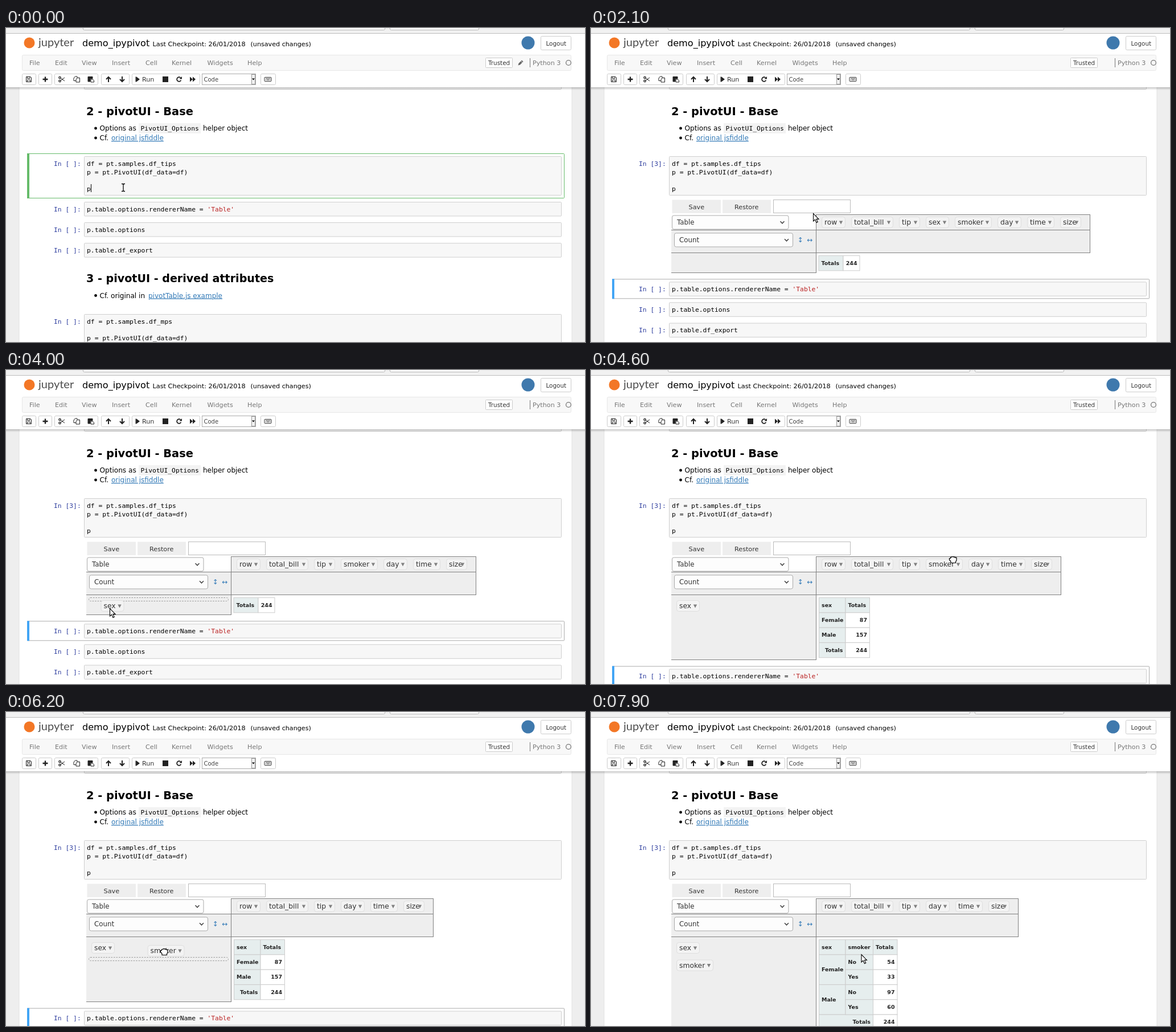
Animation, 1017 px wide and 551 px high, one loop 8000 ms. Source, as an HTML page:

```html
<!DOCTYPE html>
<html lang="en">
<head>
<meta charset="utf-8">
<title>Notebook pivot demo</title>
<style>
html, body { margin: 0; width: 100%; height: 100%; overflow: hidden; background: #eee; }
svg { display: block; width: 1017px; height: 551px; }
text { font-family: "DejaVu Sans", sans-serif; white-space: pre; }
.code { font: 11.33px "DejaVu Sans Mono", monospace; }
.bold { font-weight: bold; }
.word { font-family: Lato, sans-serif; }
</style>
</head>
<body>
<svg viewBox="0 0 1017 551" xmlns="http://www.w3.org/2000/svg">
  <g id="page"></g>
  <g id="head"></g>
  <g id="over"></g>
</svg>
<script>
const LOOP = 8000, STEP = 100;
const $ = id => document.getElementById(id);

// Drawing helpers
const rect = (x, y, x2, y2, fill, stroke = 'none', r = 0, extra = '') =>
  `<rect x="${x}" y="${y}" width="${x2 - x}" height="${y2 - y}" fill="${fill}" stroke="${stroke}" rx="${r}" ${extra}/>`;
const path = (d, stroke = '#222', fill = 'none', w = 1) =>
  `<path d="${d}" stroke="${stroke}" fill="${fill}" stroke-width="${w}"/>`;
const text = (x, y, s, size, fill = '#000', extra = '') =>
  `<text x="${x}" y="${y}" font-size="${size}" fill="${fill}" ${extra}>${s}</text>`;
const code = (x, y, s, fill = '#000') => text(x, y, s, 11.33, fill, 'class="code"');
const bold = (x, y, s, size, extra = '') => text(x, y, s, size, '#000', `class="bold" ${extra}`);
const circle = (x, y, r, fill, stroke = 'none') =>
  `<circle cx="${x}" cy="${y}" r="${r}" fill="${fill}" stroke="${stroke}" stroke-width="1.3"/>`;
const at = (x, y, s) => `<g transform="translate(${x} ${y})">${s}</g>`;
const link = (x, y, s) => text(x, y, s, 12, '#337ab7', 'text-decoration="underline"');

function header() {
  let s = rect(0, 0, 1017, 9, '#f1f1f1') + rect(135.5, -8, 665.5, 3.5, '#fff', '#b5b5b5', 2)
    + rect(674.5, -8, 830.5, 3.5, '#fff', '#b5b5b5', 2) + rect(0, 9, 1017, 104, '#fff')
    + path('M0 9.5H1017', '#bdbdbd')
    + `<rect y="104" width="1017" height="5" fill="url(#shade)"/>`
    + `<defs><linearGradient id="shade" x2="0" y2="1"><stop stop-opacity=".22"/><stop offset="1" stop-opacity="0"/></linearGradient></defs>`;
  s += circle(41, 26, 9.5, '#f37726') + text(57, 32, 'jupyter', 20, '#4e4e4e', 'class="word"')
    + text(134, 32, 'demo_ipypivot', 16.1)
    + text(257.5, 31.5, 'Last Checkpoint: 26/01/2018', 11.3)
    + text(429.5, 31.5, '(unsaved changes)', 11.15)
    + circle(917, 26, 11.5, '#3f79ad')
    + rect(939.5, 14.5, 992.5, 38.5, '#fff', '#ccc', 2) + text(948.5, 31, 'Logout', 10.4, '#333');
  s += rect(28.5, 47.5, 992.5, 74.5, '#f8f8f8', '#e7e7e7', 2);
  const menu = { File: 41, Edit: 86, View: 133, Insert: 186, Cell: 245, Kernel: 291, Widgets: 353.5, Help: 424 };
  for (const m in menu) s += text(menu[m], 65, m, 11.2, '#777');
  s += rect(842.5, 52.5, 889.5, 69.5, '#fff', '#ccc', 1) + text(847, 65, 'Trusted', 10.4, '#333')
    + path('M920.5 53V69', '#777') + text(925, 65, 'Python 3', 11.2, '#777');
  for (const [a, b] of [[28, 52], [57, 80], [85, 161], [167, 216], [221, 340], [447, 473]])
    s += rect(a + .5, 80.5, b + .5, 99.5, '#fff', '#ccc', 2);
  s += at(40, 90, path('M-4.5-4.5H3L4.5-3V4.5H-4.5ZM-2.5-4.5V-1.5H2V-4.5M-2.5 4.5V1H2.5V4.5'))
    + at(69, 90, path('M-4.5 0H4.5M0-4.5V4.5', '#222', 'none', 2.4))
    + at(98, 90, path('M-2-2L5 3M-2 2L5-3') + circle(-3.5, -3, 1.7, 'none', '#222') + circle(-3.5, 3, 1.7, 'none', '#222'))
    + at(124, 90, path('M-1 2.5H-5V-2L-2.5-5H1V-2M-1 5V0L1.5-2.5H5.5V5Z'))
    + at(149, 90, path('M-5-4.5H3V-1H-1V4H-5Z', '#222', '#222') + path('M0 0H3L5.5 2V5H0Z', '#222', '#fff'))
    + at(180, 90, path('M0 5V-4M-4 0L0-4L4 0', '#222', 'none', 2))
    + at(204, 90, path('M0-5V4M-4 0L0 4L4 0', '#222', 'none', 2))
    + at(231, 90, path('M-2-4.5V4.5L4 0Z', 'none', '#222') + path('M-2.8-4.5V4.5', '#222', 'none', 1.4))
    + text(239, 94, 'Run', 11.2, '#333') + rect(275, 85, 285, 95, '#222')
    + at(304, 90, path('M3.4 1.6A3.8 3.8 0 1 1 2.6-2.7', '#222', 'none', 1.8) + path('M5-5V-.5H.5Z', 'none', '#222'))
    + at(328, 90, path('M-5-4.5V4.5L0 0ZM0-4.5V4.5L5 0Z', 'none', '#222'))
    + rect(344.5, 80.5, 438.5, 99.5, '#fff', '#aaa') + text(347.5, 94, 'Code', 10, '#444')
    + rect(431.5, 81.5, 437.5, 98.5, '#f2f2f2', '#999') + path('M432 88.5H437L434.5 91.5Z', 'none', '#000')
    + at(460, 90, rect(-6, -3.5, 6, 3.5, '#fff', '#333', 1) + path('M-4-1.2H4.5M-4 1H-3M-2 1H2.5M3.5 1H4.5', '#333', 'none', 1));
  return s;
}

// Headings, lists and cells
const input = (y, y2) => rect(137.5, y + .5, 975.5, y2 + .5, '#f7f7f7', '#cfcfcf', 1);
const prompt = (y, n = ' ') => code(84, y, `In [${n}]:`, '#303f9f');
const bullet = y => circle(157.5, y, 2.4, '#000');
const frame = (y, y2, edge, bar) => rect(37.5, y, 980.5, y2, '#fff', edge, 1) + rect(37, y - .5, 41, y2 + .5, bar);
const lineCell = (y, s) => input(y - 12.5, y + 12) + prompt(y + 4) + code(142, y + 4, s);

function notebook(t, shift) {
  const edit = t < 500, mark = edit ? ' ' : t < 700 ? '*' : '3';
  let s = rect(0, 100, 1017, 551, '#eee')
    + rect(23, 100, 994, 560, '#fff', '#e2e2e2') + input(90, 107)
    + bold(141, 153, '2 - pivotUI - Base', 19.4)
    + bullet(176) + text(164.5, 180, 'Options as', 12.1)
    + rect(233, 167, 342, 185, '#f3f3f3') + code(236.5, 180, 'PivotUI_Options') + text(346, 180, 'helper object', 12)
    + bullet(193) + text(164.5, 197, 'Cf.', 12.1) + link(185, 197, 'original jsfiddle');
  if (edit) s += frame(220.5, 298.5, '#66bb6a', '#66bb6a');
  s += input(225, 293) + prompt(242, mark) + code(142, 242, 'df = pt.samples.df_tips')
    + code(142, 256.5, 'p = pt.PivotUI(df_data=df)') + code(142, 285.5, 'p');
  if (edit) s += path('M149.5 274V288', '#000');
  let rest = edit ? '' : frame(300.5, 334.5, '#ababab', '#42a5f5');
  rest += lineCell(317.5, `p.table.options.rendererName = <tspan fill="#ba2121">'Table'</tspan>`)
    + lineCell(353.5, 'p.table.options') + lineCell(389.7, 'p.table.df_export')
    + bold(141, 446, '3 - pivotUI - derived attributes', 19.1)
    + bullet(469.5) + text(164.5, 473.5, 'Cf. original in', 12.1) + link(250, 473.5, 'pivotTable.js example')
    + input(502, 590) + prompt(519) + code(142, 519, 'df = pt.samples.df_mps')
    + code(142, 547.5, 'p = pt.PivotUI(df_data=df)');
  return s + at(0, shift, rest);
}

// Pivot widget
const PITCH = { row: 52, total_bill: 84, tip: 47, sex: 51, smoker: 75, day: 52, time: 58, size: 47 };
const HOLE = 27;
const pill = (name, x, y) => rect(x - 4.5, y - 9.5, x + PITCH[name] - 15.5, y + 9.5, '#f3f3f3', '#dedede', 4)
  + text(x, y + 4, name, 12.3, '#333')
  + at(x + PITCH[name] - 23, y, path('M-3.2-2.5H3.2L0 3.5Z', 'none', '#808080'));
const hole = (x, y, x2, y2) => rect(x + .5, y + .5, x2 + .5, y2 + .5, 'none', '#999', 3, 'stroke-dasharray="2.5 2"');
const select = (x, y, x2, s, tx) => rect(x, y, x2, y + 24, '#fdfdfd', '#aaa', 3) + text(tx, y + 16, s, 11.8, '#333')
  + at(x2 - 11, y + 12, path('M-3.5-1.8L0 1.8L3.5-1.8', '#444', 'none', 1.5));

const ROW = 26.3, TOP = 399.5;
function cell(x, x2, row, s, { span = 1, head = true, end = false } = {}) {
  const y = TOP + row * ROW, h = ROW * span;
  return rect(x, y, x2, y + h, head ? '#e6eeee' : '#fff', '#cdcdcd')
    + text(end ? x2 - 4.5 : x + 4.5, y + h / 2 + 3.2, s, 9.5, '#222', `class="bold" text-anchor="${end ? 'end' : 'start'}"`);
}
const num = { head: false, end: true };

function table(level) {
  if (!level) return cell(400, 443, 0, 'Totals') + cell(443, 472, 0, 244, num);
  let s = cell(400.5, 447, 0, 'sex');
  if (level === 1) {
    s += cell(447, 489.5, 0, 'Totals') + cell(400.5, 447, 1, 'Female') + cell(400.5, 447, 2, 'Male')
      + cell(400.5, 447, 3, 'Totals', { end: true });
    [87, 157, 244].forEach((n, i) => s += cell(447, 489.5, i + 1, n, num));
    return s;
  }
  s += cell(447, 495.5, 0, 'smoker') + cell(495.5, 538, 0, 'Totals')
    + cell(400.5, 447, 1, 'Female', { span: 2 }) + cell(400.5, 447, 3, 'Male', { span: 2 })
    + cell(400.5, 495.5, 5, 'Totals', { end: true });
  [54, 33, 97, 60, 244].forEach((n, i) => {
    if (i < 4) s += cell(447, 495.5, i + 1, i % 2 ? 'Yes' : 'No');
    s += cell(495.5, 538, i + 1, n, num);
  });
  return s;
}

function pivot(t, level, drag) {
  const bottom = [430, 509, 562][level];
  const zone = !drag ? '' : drag === 'sex'
    ? (t < 3500 ? 'unused' : t < 3600 ? 'cols' : 'rows')
    : (t < 5400 ? 'unused' : t < 5700 ? 'cols' : 'rows');
  let x = 410, attrs = '';
  for (const name in PITCH) {
    if (name === drag) {
      if (zone === 'unused') { attrs += hole(x - 9, 331, x + 17, 350); x += HOLE; }
    } else if (!(name === 'sex' && t >= 3300) && !(name === 'smoker' && t >= 5300)) {
      attrs += pill(name, x, 341);
      x += PITCH[name];
    }
  }
  let s = rect(141, 354, 395, bottom, '#eee') + rect(395.5, 327.5, x + .5, 394.5, '#eee', '#808080')
    + path(`M141 354.5H${x}M141 394.5H395M395.5 354V${bottom}M141 ${bottom - .5}H395.5`, '#808080')
    + select(142.5, 329, 347, 'Table', 151) + select(146.5, 360, 354.5, 'Count', 155)
    + text(362.5, 376, '↕', 12, '#337ab7') + text(379, 376, '↔', 12, '#337ab7') + attrs + table(level);
  if (zone === 'cols') s += hole(400, 363, 426, 383);
  const above = drag === 'smoker' && t >= 6300 && t < 6700;
  if (zone === 'rows') {
    const y = drag === 'sex' || above ? 399 : 430;
    s += hole(145, y, 390, y + 6);
  }
  if (t >= 4200) s += pill('sex', 155, above ? 421 : 414);
  if (t >= 7200) s += pill('smoker', 155, 444.5);
  return s;
}

// Pointer: time, x, y
const TRACK = [
  [0, 206, 280], [1300, 206, 280], [1400, 206, 279], [1500, 206, 279], [1600, 243, 344], [1700, 243, 344],
  [2100, 390, 325], [2600, 575, 342], [3000, 604, 345], [3200, 604, 345], [3300, 572, 358],
  [3400, 519, 371], [3600, 350, 405], [3700, 260, 415], [3900, 182, 418], [4100, 182, 418],
  [4500, 570, 342], [4600, 636, 333], [5000, 625, 346], [5100, 617, 345], [5200, 617, 345],
  [5300, 566, 363], [5400, 518, 383], [5500, 480, 399], [5800, 320, 424], [6000, 276, 423], [6100, 276, 423],
  [6300, 280, 419], [6500, 280, 419], [6800, 291, 445], [7200, 291, 445], [7900, 474.5, 425], [8000, 474.5, 425]
];
function pointer(t) {
  const i = Math.max(1, TRACK.findIndex(k => k[0] >= t));
  const [t0, x0, y0] = TRACK[i - 1], [t1, x1, y1] = TRACK[i];
  const p = (t - t0) / (t1 - t0);
  return [x0 + (x1 - x0) * p, y0 + (y1 - y0) * p];
}

const IBEAM = path('M-3-6.5H-1L0-5.5L1-6.5H3M0-5.5V5.5M-3 6.5H-1L0 5.5L1 6.5H3', '#fff', 'none', 3)
  + path('M-3-6.5H-1L0-5.5L1-6.5H3M0-5.5V5.5M-3 6.5H-1L0 5.5L1 6.5H3', '#000', 'none', 1.3);
const ARROW = path('M.5 .5V14L3.5 11.2L6 16.5L8.2 15.5L5.9 10.4H10Z', '#000', '#fff', 1.1);
const HAND = path('M-4 5.5V3L-6.5 0V-2.5H-4.5V-4.5H-2V-5.5H1V-4.7H3.5V-3.8H6V1L4.5 3.5V5.5Z', '#000', '#fff', 1.2);
function cursor(t) {
  const hand = (t >= 2600 && t < 3300) || (t >= 4600 && t < 7400);
  return at(...pointer(t), t < 1600 ? IBEAM : hand ? HAND : ARROW);
}

function draw(t) {
  const level = t < 4400 ? 0 : t < 7400 ? 1 : 2;
  const open = t >= 1500;
  const shift = t < 600 ? 0 : !open ? 36.5 : [140.3, 219.5, 272][level];
  const drag = t >= 3300 && t < 4200 ? 'sex' : t >= 5300 && t < 7200 ? 'smoker' : '';
  let s = notebook(t, shift);
  if (t >= 600) s += rect(142.5, 301.5, 228, 325, '#eee') + text(171.5, 317.5, 'Save', 11.3, '#333')
    + rect(231, 301.5, 316, 325, '#eee') + text(252, 317.5, 'Restore', 11.2, '#333')
    + rect(320.5, 301.5, 455.5, 324.5, '#fff', '#bbb');
  if (open) s += pivot(t, level, drag);
  $('page').innerHTML = s;

  const busy = t >= 500 && t < 800;
  let o = circle(988, 61, 4.4, busy ? '#777' : 'none', '#777');
  if (t < 500) o += at(904, 61, path('M-4.5 4.5L-3.5 1L2-4.5L4.5-2L-1 3.5Z', 'none', '#666') + path('M.4-3L3-.4', '#f8f8f8'));
  if (drag) {
    // The carried label trails the pointer by one step
    const [x, y] = pointer(t - STEP);
    o += pill(drag, x + 5 - (PITCH[drag] - 20) / 2, y - 4);
  }
  $('over').innerHTML = o + cursor(t);
}

$('head').innerHTML = header();
let start, shown = -1;
function tick(now) {
  start ??= now;
  const t = Math.floor((now - start) % LOOP / STEP) * STEP;
  if (t !== shown) draw(shown = t);
  requestAnimationFrame(tick);
}
draw(0);
requestAnimationFrame(tick);
</script>
</body>
</html>
```
